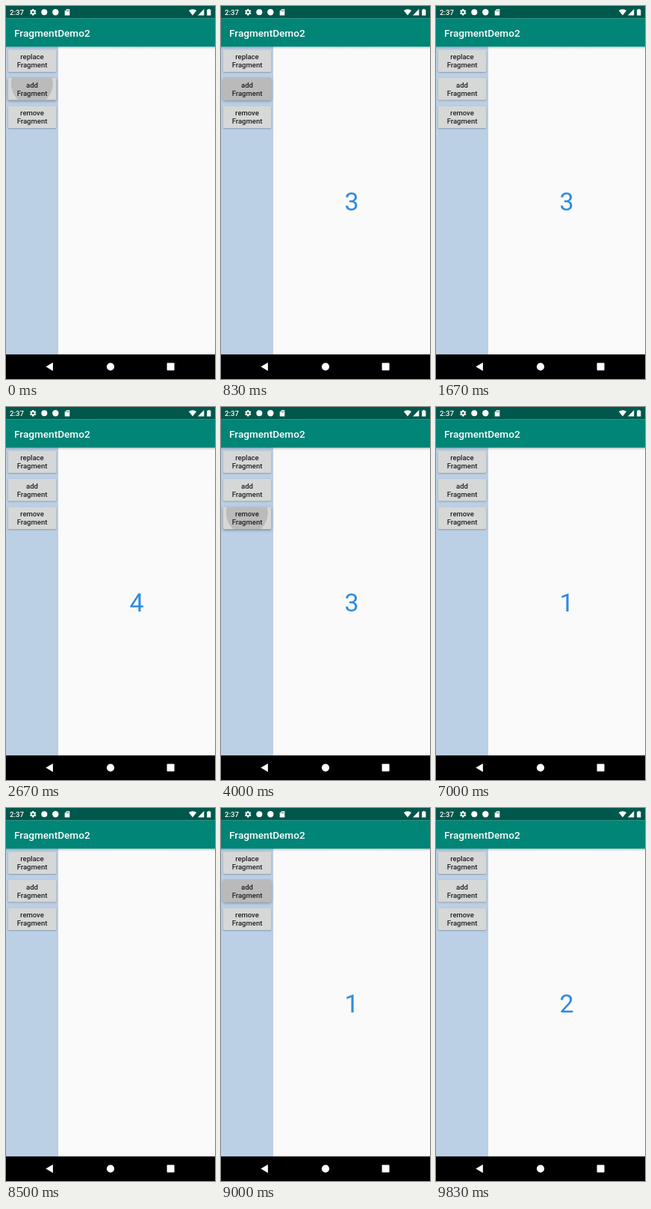
Recreate the animation shown at these times as an HTML page with a canvas. Size 280 by 498 pixels, loop 9990 ms.

```html
<!DOCTYPE html>
<html lang="en">
<head>
<meta charset="utf-8">
<title>FragmentDemo2</title>
<style>
html, body { margin: 0; width: 100%; height: 100%; overflow: hidden; background: #fafafa; }
canvas { display: block; width: 280px; height: 498px; }
</style>
</head>
<body>
<canvas id="stage"></canvas>
<script>
const W = 280, H = 498, LOOP = 9990, STEP = 1000 / 6;
const canvas = document.getElementById('stage');
const ctx = canvas.getContext('2d');
const dpr = window.devicePixelRatio || 1;
canvas.width = W * dpr;
canvas.height = H * dpr;

const LABELS = ['replace', 'add', 'remove'];

// Each tap: first step, button, steps it stays visible, number shown afterwards
const TAPS = [
  [0, 1, 2, 1], [2, 1, 2, 2], [4, 1, 3, 3], [12, 1, 4, 4],
  [24, 2, 1, 3], [30, 2, 3, 2], [33, 2, 3, 1],
  [48, 2, 3, 0], [52, 1, 3, 1], [55, 1, 4, 2]
];

function stateAt(step) {
  const state = { value: 0, button: -1, ripple: false, level: 0 };
  TAPS.forEach(([start, button, length, value], i) => {
    const age = step - start;
    if (age >= Math.min(1, length - 1)) state.value = value;
    if (age < 0 || age >= length) return;
    const next = TAPS[i + 1];
    const chained = next && next[0] === start + length;
    const fading = length > 2 && age === length - 1 && !chained;
    state.button = button;
    state.ripple = age === 0;
    state.level = fading ? 0.5 : 1;
  });
  return state;
}

function rect(x, y, w, h, color) {
  ctx.fillStyle = color;
  ctx.fillRect(x, y, w, h);
}

function disc(x, y, r, color) {
  ctx.fillStyle = color;
  ctx.beginPath();
  ctx.arc(x, y, r, 0, Math.PI * 2);
  ctx.fill();
}

function poly(points, color) {
  ctx.fillStyle = color;
  ctx.beginPath();
  points.forEach(([x, y]) => ctx.lineTo(x, y));
  ctx.closePath();
  ctx.fill();
}

function text(str, x, y, size, weight, color, align = 'left') {
  ctx.font = `${weight} ${size}px Roboto, sans-serif`;
  ctx.textAlign = align;
  ctx.fillStyle = color;
  ctx.fillText(str, x, y);
}

function gear(x, y) {
  for (let i = 0; i < 6; i++) {
    ctx.save();
    ctx.translate(x, y);
    ctx.rotate(i * Math.PI / 3);
    rect(-1, -4.3, 2, 2.2, '#fff');
    ctx.restore();
  }
  disc(x, y, 3.2, '#fff');
  disc(x, y, 1.4, '#00574b');
}

function statusBar() {
  rect(0, 0, W, 16.3, '#00574b');
  text('2:37', 5, 12, 9.6, 500, '#fff');
  gear(36.2, 8.3);
  disc(51.3, 8.3, 4, '#fff');
  disc(66.3, 8.3, 4.2, '#fff');

  // Memory card
  poly([[81.2, 4.2], [85.3, 4.2], [85.3, 12.4], [78.7, 12.4], [78.7, 6.8]], '#fff');
  for (let i = 0; i < 3; i++) rect(80.5 + i * 1.5, 5.5, 0.7, 1.8, '#00574b');

  // Wi-Fi fan
  ctx.fillStyle = '#fff';
  ctx.beginPath();
  ctx.moveTo(250, 12.6);
  ctx.lineTo(244.8, 6.1);
  ctx.quadraticCurveTo(250, 2.5, 255.2, 6.1);
  ctx.fill();

  poly([[265.3, 4], [265.3, 12.4], [257, 12.4]], '#fff');
  rect(269.2, 4.8, 5.2, 7.8, '#fff');
  rect(270.8, 3.9, 2, 1, '#fff');
}

function appBar() {
  const shade = ctx.createLinearGradient(0, 54.4, 0, 58);
  shade.addColorStop(0, 'rgba(0,0,0,.16)');
  shade.addColorStop(1, 'rgba(0,0,0,0)');
  rect(0, 54.4, W, 3.6, shade);
  rect(0, 16.3, W, 38.1, '#008577');
  text('FragmentDemo2', 11, 40.7, 13.6, 500, '#fff');
}

function navBar() {
  rect(0, 465.2, W, H - 465.2, '#000');
  poly([[53.3, 481.6], [62.9, 476], [62.9, 487.2]], '#fff');
  disc(140, 481.6, 5.1, '#fff');
  ctx.beginPath();
  ctx.roundRect(215.6, 476.6, 10, 10, 0.8);
  ctx.fill();
}

function button(i, state) {
  const x = 2.7, y = 58.4 + i * 37.5, w = 64.6, h = 29.6;
  const active = state.button === i;
  const lift = active ? state.level : 0;

  ctx.save();
  ctx.beginPath();
  ctx.roundRect(x, y, w, h, 1.4);
  ctx.shadowColor = `rgba(0,0,0,${0.3 + 0.08 * lift})`;
  ctx.shadowBlur = (1.8 + 2 * lift) * dpr;
  ctx.shadowOffsetY = (0.8 + 0.5 * lift) * dpr;
  ctx.fillStyle = '#d6d7d7';
  ctx.fill();
  ctx.shadowColor = 'transparent';
  ctx.clip();
  if (active) {
    ctx.globalAlpha = state.level;
    if (state.ripple) disc(34.8, y + 8.2, 28, '#bbb');
    else rect(x, y, w, h, '#bababa');
  }
  ctx.restore();

  text(LABELS[i], 35, y + 13, 9.53, 500, '#212121', 'center');
  text('Fragment', 35, y + 24, 9.53, 500, '#212121', 'center');
}

function draw(time) {
  const state = stateAt(Math.floor((time % LOOP + 4) / STEP));
  ctx.setTransform(dpr, 0, 0, dpr, 0, 0);
  rect(0, 0, W, H, '#fafafa');
  rect(0, 54, 70, 412, '#bbcfe5');
  appBar();
  statusBar();
  navBar();
  LABELS.forEach((_, i) => button(i, state));
  if (state.value) text(state.value, 175, 273.2, 34, 400, '#2e8bdf', 'center');
}

const began = performance.now();
function tick() {
  draw(performance.now() - began);
  requestAnimationFrame(tick);
}
tick();
</script>
</body>
</html>
```
